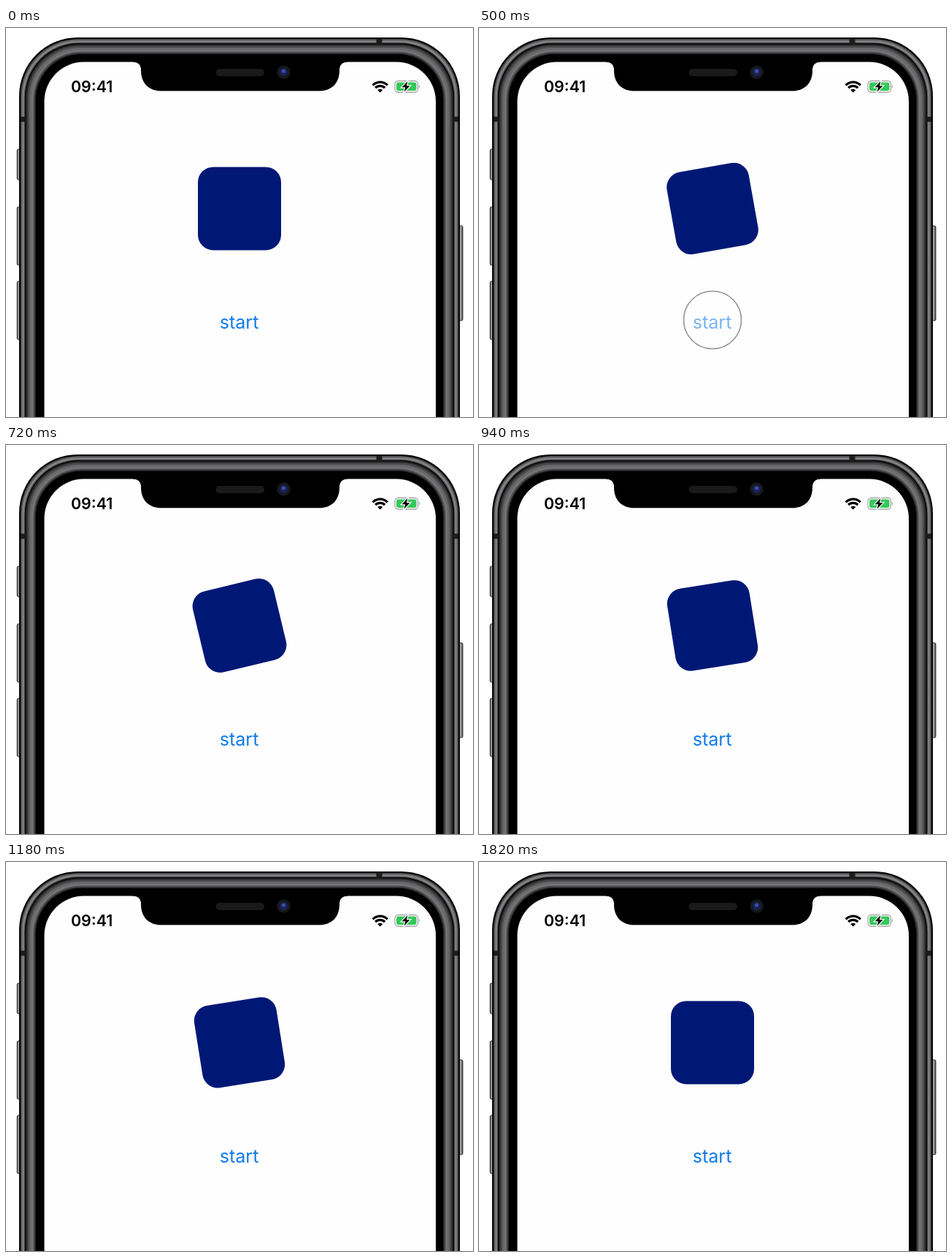
Recreate the animation shown at these times as an HTML page. Size 640 px wide and 533 px high, loop 2280 ms.

```html
<!DOCTYPE html>
<html lang="en">
<head>
<meta charset="utf-8">
<title>Wobble</title>
<style>
  html, body { margin: 0; width: 100%; height: 100%; overflow: hidden; background: #fff; }
  svg { display: block; width: 100vw; height: 100vh; }
  text { font-family: Inter, "Liberation Sans", sans-serif; text-anchor: middle; }
</style>
</head>
<body>
<svg viewBox="0 0 640 533">
  <defs>
    <linearGradient id="key">
      <stop offset="0" stop-color="#4a4a4b"/>
      <stop offset=".4" stop-color="#b4b4b5"/>
      <stop offset="1" stop-color="#555556"/>
    </linearGradient>
  </defs>

  <g id="keys" fill="url(#key)" stroke="#111" stroke-width=".8"></g>
  <g id="body"></g>

  <g fill="#1b1b1c">
    <rect x="507.5" y="15" width="8" height="8"/>
    <rect x="20" y="121.5" width="7" height="7"/>
    <rect x="613" y="121.5" width="7" height="7"/>
  </g>

  <!-- notch -->
  <path d="M174 45H468V46.600Q458 47 457 56V58C457 76 446 86.300 429 86.300H213C196 86.300 185 76 185 58V56Q184 47 174 46.600Z"/>
  <rect x="287.500" y="56" width="66.500" height="10" rx="5" fill="#1a1a1b"/>
  <circle cx="380.500" cy="60.500" r="9.300" fill="#17181d"/>
  <circle cx="380.500" cy="60.500" r="5.500" fill="#182356"/>
  <circle cx="380.500" cy="59" r="2.600" fill="#3a4fa8"/>

  <!-- status bar -->
  <text x="117.700" y="88.400" font-size="21.500" font-weight="600">09:41</text>
  <g fill="none" stroke="#000" stroke-width="3.200">
    <path d="M502.600 78.400A14.200 14.200 0 0 1 522.800 78.400"/>
    <path d="M506.200 82A9.200 9.200 0 0 1 519.200 82"/>
  </g>
  <path d="M512.700 88.600L509.200 85.100A5 5 0 0 1 516.200 85.100Z"/>
  <rect x="533" y="72.500" width="31.500" height="15.500" rx="4.500" fill="#fff" stroke="#a5a5a5" stroke-width="1.300"/>
  <rect x="535" y="74.500" width="27.500" height="11.500" rx="2.700" fill="#34c85a"/>
  <path d="M566 77.500Q568.400 80.200 566 83Z" fill="#a5a5a5"/>
  <path d="M550.300 73L542.600 81.200H547.200L545.600 87.600L553.600 79.200H548.900Z"
        stroke="#fff" stroke-width="2.400" paint-order="stroke"/>

  <!-- content -->
  <rect id="box" x="263" y="190.400" width="114" height="114" rx="21" fill="#001875"/>
  <circle id="ring" cx="320" cy="400" fill="none" stroke="#959595" stroke-width="1.600"/>
  <text id="label" x="319.500" y="412.300" font-size="25.100" fill="#117bea">start</text>
</svg>

<script>
const LOOP = 2280;
const FRAME = 1000 / 60;
const ANGLE = 9;
const SWING = 100;              // ms of one swing
const SWING_FRAMES = 7;         // screen refreshes one swing takes up
const SWINGS = 7;
const PRESS = 320, RELEASE = 466, WOBBLE = 553;
const STOP = WOBBLE + SWINGS * SWING_FRAMES * FRAME;

const $ = id => document.getElementById(id);

function addRect(parent, attrs) {
  const rect = document.createElementNS("http://www.w3.org/2000/svg", "rect");
  for (const name in attrs) rect.setAttribute(name, attrs[name]);
  parent.append(rect);
}

// metal rim: nested shells, as [inset, colour]
const shells = [
  [0, "#000"], [2, "#48484a"], [3.5, "#707072"], [5, "#8a8a8c"], [6.5, "#59595b"],
  [7.8, "#080808"], [9.5, "#2b2b2c"], [11.5, "#4b4b4c"], [14, "#68686a"],
  [17, "#747476"], [19.5, "#4d4d4e"], [21.5, "#202021"], [23, "#000"]
];
for (const [inset, fill] of shells) {
  addRect($("body"), {
    x: 18 + inset, y: 13 + inset, width: 604 - 2 * inset, height: 700,
    rx: 80 - .76 * inset, fill
  });
}
addRect($("body"), { x: 52.5, y: 46.6, width: 536.5, height: 700, rx: 54, fill: "#fefefe" });

// side buttons: x, y, height
const keys = [[15.2, 166, 42], [15.2, 245, 80], [15.2, 347, 80], [619.5, 271, 130]];
for (const [x, y, height] of keys) {
  addRect($("keys"), { x, y, width: 6.5, height, rx: 2 });
}

const clamp = x => Math.max(0, Math.min(1, x));
const part = (t, from, to) => clamp((t - from) / (to - from));
const easeInOut = x => x < .5 ? 2 * x * x : 1 - 2 * (1 - x) ** 2;
const easeOut = x => 1 - (1 - x) ** 2;
const elastic = x => 1 - Math.cos(x * Math.PI / 2) ** 3 * Math.cos(x * 1.5 * Math.PI);

// the value steps once per screen refresh
function swing(from, to, elapsed, duration) {
  const time = Math.floor(elapsed / FRAME + 1e-6) * FRAME;
  return from + (to - from) * elastic(clamp(time / duration));
}

function angleAt(t) {
  if (t < RELEASE) return 0;
  if (t < WOBBLE) return swing(0, -ANGLE, t - RELEASE, SWING / 2);
  if (t >= STOP) return swing(ANGLE, 0, t - STOP, SWING / 2);
  const length = SWING_FRAMES * FRAME;
  const n = Math.floor((t - WOBBLE) / length);
  const to = n % 2 ? -ANGLE : ANGLE;
  return swing(-to, to, t - WOBBLE - n * length, SWING);
}

function draw(t) {
  $("box").setAttribute("transform", `rotate(${angleAt(t)} 320 247.4)`);

  const show = easeOut(part(t, PRESS, PRESS + 80));
  const leave = part(t, 500, 660);
  $("ring").setAttribute("r", 39.3 * (.6 + .4 * show) + 20 * easeOut(leave));
  $("ring").setAttribute("opacity", show * (1 - leave));

  const dim = easeInOut(part(t, 340, 460)) - easeInOut(part(t, 470, 700));
  $("label").setAttribute("opacity", 1 - .46 * dim);
}

const start = performance.now();
function tick() {
  draw((performance.now() - start) % LOOP);
  requestAnimationFrame(tick);
}
draw(0);
requestAnimationFrame(tick);
</script>
</body>
</html>
```
